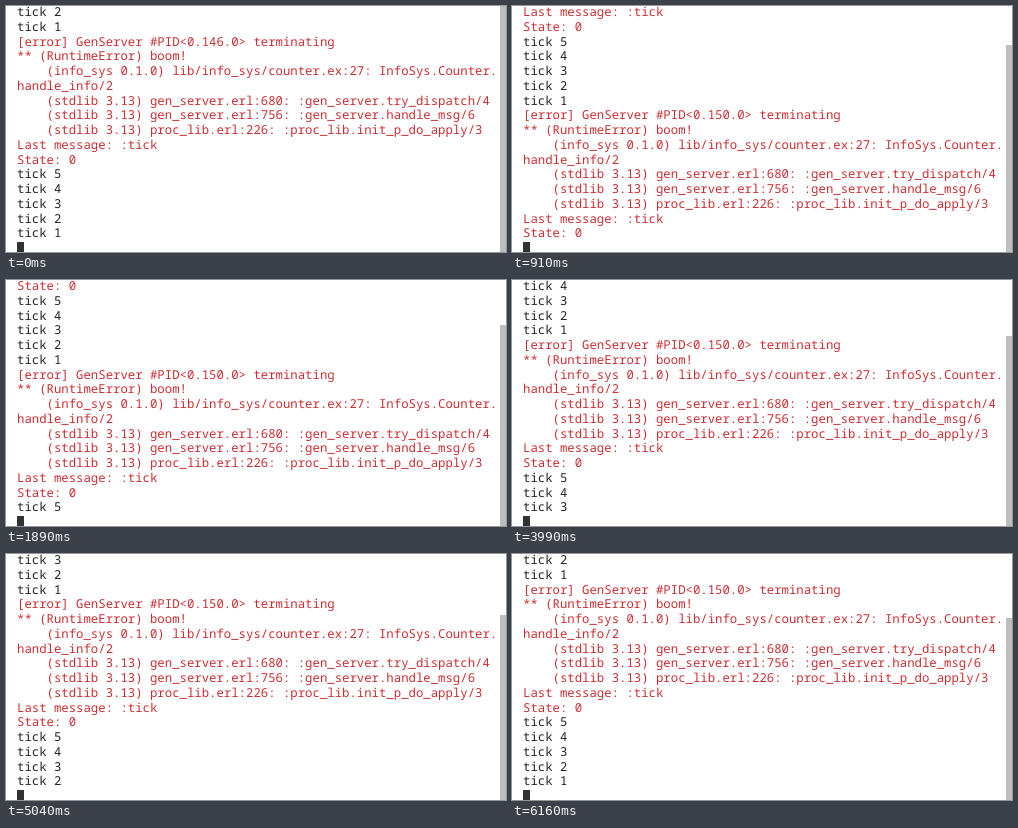
These frames come from a looping animation (500x246 px, 6510 ms). An HTML page:

```html
<!DOCTYPE html>
<html lang="en">
<head>
<meta charset="utf-8">
<title>Terminal</title>
<style>
  html, body { margin: 0; width: 100%; height: 100%; overflow: hidden; background: #fff; }
  #log {
    position: absolute; left: 11px; top: -0.8px; margin: 0;
    font: 500 12.32px/14.75px "Noto Sans Mono", "DejaVu Sans Mono", monospace;
    font-variant-ligatures: none; text-rendering: geometricPrecision;
    white-space: pre; color: #242328;
  }
  #log div { height: 14.75px; }
  .error { color: #ca2f33; }
  #cursor { position: absolute; left: 11px; top: 236px; width: 7px; height: 10px; background: #323136; }
  #thumb { position: absolute; left: 494px; right: 0; bottom: 0; background: #bebebe; }
</style>
</head>
<body>
<div id="log"></div>
<div id="cursor"></div>
<div id="thumb"></div>
<script>
const LOOP = 6510, ROWS = 16;
const log = document.getElementById("log");
const thumb = document.getElementById("thumb");

const ticks = from => Array.from({ length: from }, (_, i) => `tick ${from - i}`);
const crash = pid => [
  `[error] GenServer #PID<0.${pid}.0> terminating`,
  "** (RuntimeError) boom!",
  "    (info_sys 0.1.0) lib/info_sys/counter.ex:27: InfoSys.Counter.",
  "handle_info/2",
  "    (stdlib 3.13) gen_server.erl:680: :gen_server.try_dispatch/4",
  "    (stdlib 3.13) gen_server.erl:756: :gen_server.handle_msg/6",
  "    (stdlib 3.13) proc_lib.erl:226: :proc_lib.init_p_do_apply/3",
  "Last message: :tick",
  "State: 0"
];
const lines = [...ticks(2), ...crash(146), ...ticks(5), ...crash(150), ...ticks(5)];

// start time, lines printed so far, top of the scrollbar thumb
const steps = [
  [0, 16, 0], [840, 25, 39], [910, 25, 39], [1890, 26, 45], [2940, 27, 51],
  [3990, 28, 56], [5040, 29, 61], [6090, 30, 63], [6160, 30, 64]
];

function show([, count, top]) {
  log.replaceChildren(...lines.slice(count - ROWS, count).map(text => {
    const row = document.createElement("div");
    row.textContent = text;
    if (!text.startsWith("tick")) row.className = "error";
    return row;
  }));
  thumb.style.top = top + "px";
}

let current;
function draw(now) {
  const t = now % LOOP;
  const step = steps.findLast(([start]) => start <= t);
  if (step !== current) show(current = step);
}

const begin = performance.now();
function frame() {
  draw(performance.now() - begin);
  requestAnimationFrame(frame);
}
frame();
</script>
</body>
</html>
```
